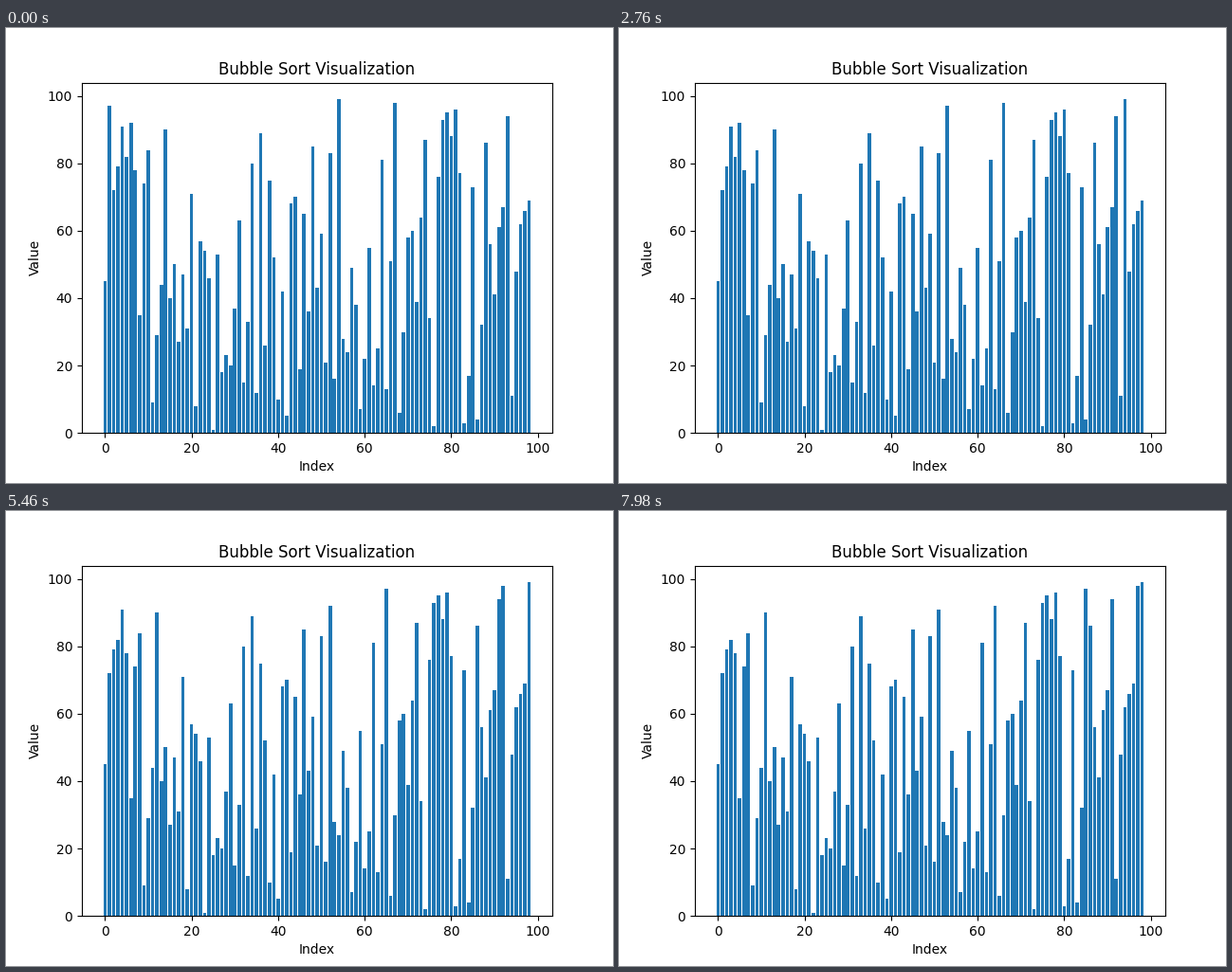
Animation of 640x480 px, one loop 8 s. Source, as a matplotlib script:

```python
import matplotlib.pyplot as plt
from matplotlib.animation import FuncAnimation

LOOP_MS = 8000
STEPS = 267

VALUES = [
    45, 97, 72, 79, 91, 82, 92, 78, 35, 74,
    84, 9, 29, 44, 90, 40, 50, 27, 47, 31,
    71, 8, 57, 54, 46, 1, 53, 18, 23, 20,
    37, 63, 15, 33, 80, 12, 89, 26, 75, 52,
    10, 42, 5, 68, 70, 19, 65, 36, 85, 43,
    59, 21, 83, 16, 99, 28, 24, 49, 38, 7,
    22, 55, 14, 25, 81, 13, 51, 98, 6, 30,
    58, 60, 39, 64, 87, 34, 2, 76, 93, 95,
    88, 96, 77, 3, 17, 73, 4, 32, 86, 56,
    41, 61, 67, 94, 11, 48, 62, 66, 69,
]


def bubble_sort(values):
    """Yield the list at the start and after every swap."""
    a = list(values)
    yield a.copy()
    for end in range(len(a) - 1, 0, -1):
        for j in range(end):
            if a[j] > a[j + 1]:
                a[j], a[j + 1] = a[j + 1], a[j]
                yield a.copy()


states = [state for _, state in zip(range(STEPS), bubble_sort(VALUES))]

fig, ax = plt.subplots(figsize=(6.4, 4.8), dpi=100)
bars = ax.bar(range(len(VALUES)), VALUES)
ax.set_title("Bubble Sort Visualization")
ax.set_xlabel("Index")
ax.set_ylabel("Value")


def update(step):
    for bar, height in zip(bars, states[step]):
        bar.set_height(height)
    return bars.patches


anim = FuncAnimation(fig, update, frames=STEPS, interval=LOOP_MS / STEPS,
                     repeat=True, repeat_delay=0, cache_frame_data=False)
plt.show()
```
